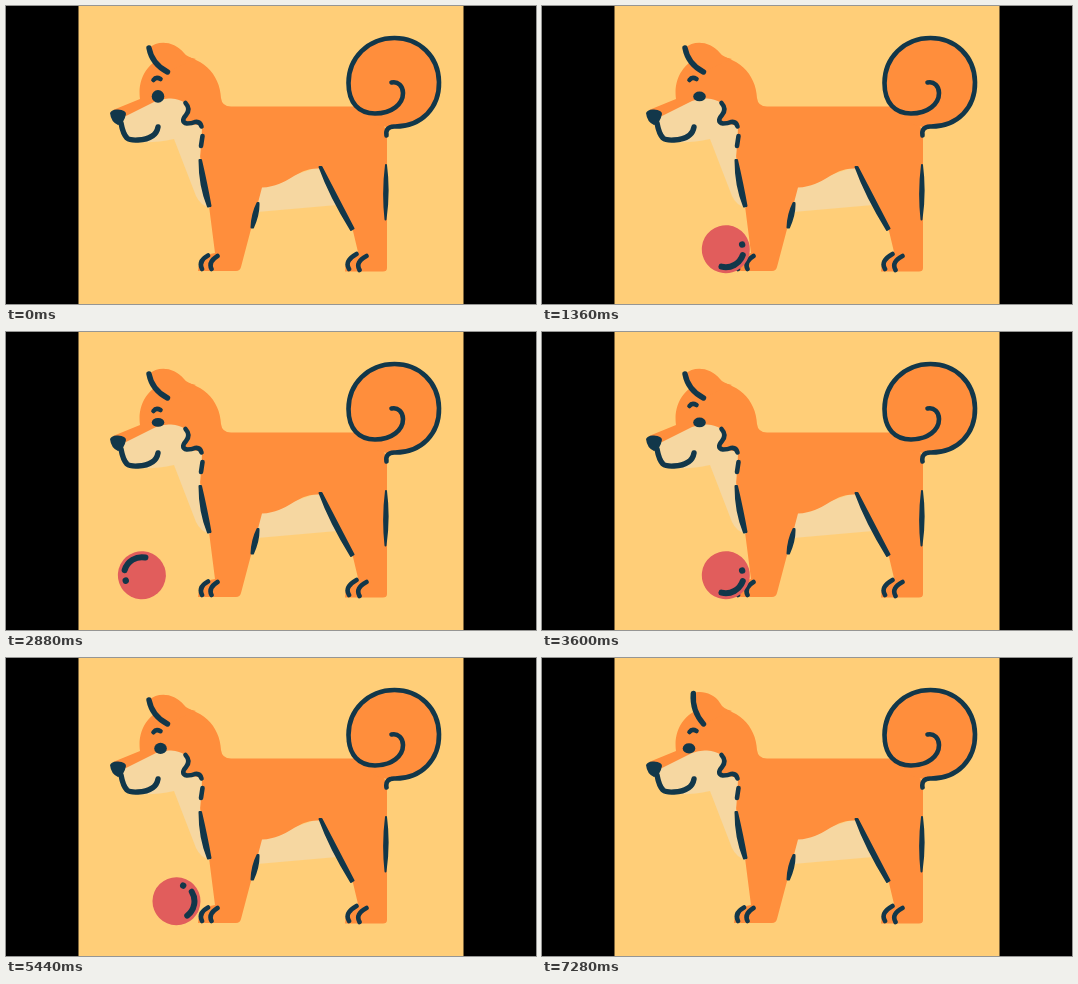
Animation, 530 px wide and 298 px high, one loop 7360 ms. Source, as an HTML page:

```html
<!DOCTYPE html>
<html>
<head>
<meta charset="utf-8">
<style>
  html, body { margin: 0; height: 100%; overflow: hidden; background: #000; }
  svg { display: block; width: 530px; height: 298px; }
  .orange { fill: #ff8e3c; }
  .cream { fill: #f6d7a1; }
  .ink { fill: #12374a; }
  .line { fill: none; stroke: #12374a; stroke-width: 4.6; stroke-linecap: round; stroke-linejoin: round; }
  .thick { stroke-width: 5.4; }
  .brush { fill: #12374a; stroke: #12374a; stroke-width: 2; stroke-linejoin: round; }
</style>
</head>
<body>
<svg viewBox="0 0 530 298">
  <clipPath id="edge"><rect x="94" width="363" height="298"/></clipPath>
  <rect width="530" height="298"/>
  <rect x="72.5" width="385" height="298" fill="#ffce78"/>

  <!-- belly, body, tail -->
  <path class="cream" d="M254 180L316 160L331 199L251 206Z"/>
  <path class="orange" d="M107 104L134 93C131 72 143 52 166 49C196 49 214 68 215 92Q216 100.500 225 100.500H365L381 125V262Q381 265.500 377 265.500H339Q339 250 352 246L347 225Q325 195 314 162.500C290 161 284 180 256 181.500L235 261Q234 265 230 265H192Q193 249 209 247L203 200L194 150L196 122L168 133Z"/>
  <circle class="orange" cx="388" cy="76.300" r="45.500"/>
  <path class="line" d="M380.500 129.500Q379 121 388 120.500C416 121 433.500 101 433 76C432.500 50 413 32 388.500 32C362 32 342.500 52 342.500 77C342.500 97 353 107.500 369 107.500C386 107.500 397 98 397 87C397 80 392 75 385.500 76.500"/>

  <!-- head and chest -->
  <path id="earFill" class="orange"/>
  <path class="cream" d="M116 112L150 95Q157 92 165 92.500Q174 93 179 97Q184 104 177 113Q180 119 196 119L194 152L204 202Q194 199 190 190L168 133Q140 139 122 134Z"/>
  <path id="ear" class="line thick"/>
  <path id="brow" class="line" d="M147.500 74Q150 70.500 154.500 73"/>
  <ellipse id="eye" class="ink" cy="90.400" rx="6.300"/>
  <path class="ink" d="M104 107Q106 103 112 103.500Q120 104 120 108Q118 118 112 119Q105 116 104 107Z"/>
  <path class="line thick" d="M115 117Q117 128 121 132Q124 134.500 132 134Q150 133 152 121"/>
  <path class="line" d="M179.500 97Q185 103 180 109Q174 116 181 117.500Q186 117.500 189 116Q194 115 195.500 120.500M196.500 130L195 140"/>

  <!-- legs -->
  <path class="brush" d="M193.500 154Q193.500 180 202 200.500L204.500 200Q201 180 195 154Z
    M251.500 197Q246 208 245.500 221.500H247Q253 208 252.500 197Z
    M313.500 161Q324 190 345 224L347.500 222.500Q331 191 315.500 161Z
    M380 159Q376.500 186 379.500 213.500Q383.500 186 380 159Z"/>
  <path class="line" d="M196 263Q192 255 202 249.500M205.500 263Q202 256 211.500 250M343 263Q338 255 350.500 248M353.500 264Q349 256 360.500 250"/>

  <g clip-path="url(#edge)">
    <g id="ball">
      <circle r="24" fill="#e15d5c"/>
      <circle class="ink" cx="17" r="3.200"/>
      <path class="line" style="stroke-width:6" d="M14.700 10.300A18 18 0 0 1-9 15.600"/>
    </g>
  </g>
</svg>
<script>
const LOOP = 7360, CYCLE = 2480, STEP = 80;
const REST = 183.8, REST_ANGLE = 344;
const $ = id => document.getElementById(id);
const progress = (t, from, to) => Math.min(1, Math.max(0, (t - from) / (to - from)));
const smooth = p => p * p * (3 - 2 * p);
const quartic = p => p < .5 ? 8 * p ** 4 : 1 - 8 * (1 - p) ** 4;
const ramp = (t, from, to) => smooth(progress(t, from, to));

function drawBall(t) {
  const left = 1 - quartic(progress(t, 0, 692));
  const out = quartic(progress(t, 1460, 2260));
  const x = REST - 189 * left - 182 * out;
  const angle = REST_ANGLE - 720 * left - 292 * out;
  $('ball').setAttribute('transform', `translate(${x} 243.2) rotate(${angle})`);
}

function drawEye(t) {
  const look = 5.5 * ramp(t, 390, 580) - 10.5 * ramp(t, 1440, 1760) + 5 * ramp(t, 2330, 2480);
  const blink = ramp(t, 280, 390) * (1 - ramp(t, 410, 490));
  $('eye').setAttribute('cx', 152 + look);
  $('eye').setAttribute('ry', 6.3 - Math.abs(look) * .25 - blink * 2);
  $('brow').setAttribute('transform', `translate(0 ${5 * blink})`);
}

function drawEar(t) {
  const k = ramp(t, 2000, 2240) * (1 - ramp(t, 2360, 2480));
  const tip = `${143 + 8.3 * k} ${42 - 6.5 * k}`;
  const edge = `M${tip}Q${146 + 4 * k} ${58 - 5 * k} 161.5 66`;
  $('ear').setAttribute('d', edge);
  $('earFill').setAttribute('d', `${edge}L190 53Q181 51 178 ${47 - 2 * k}C${168 + 4 * k} 35 ${152 + 6 * k} ${34 - 2 * k} ${tip}Z`);
}

function frame(now) {
  const t = Math.floor(now % LOOP / STEP) * STEP % CYCLE;
  drawBall(t);
  drawEye(t);
  drawEar(t);
  requestAnimationFrame(frame);
}
frame(0);
</script>
</body>
</html>
```
